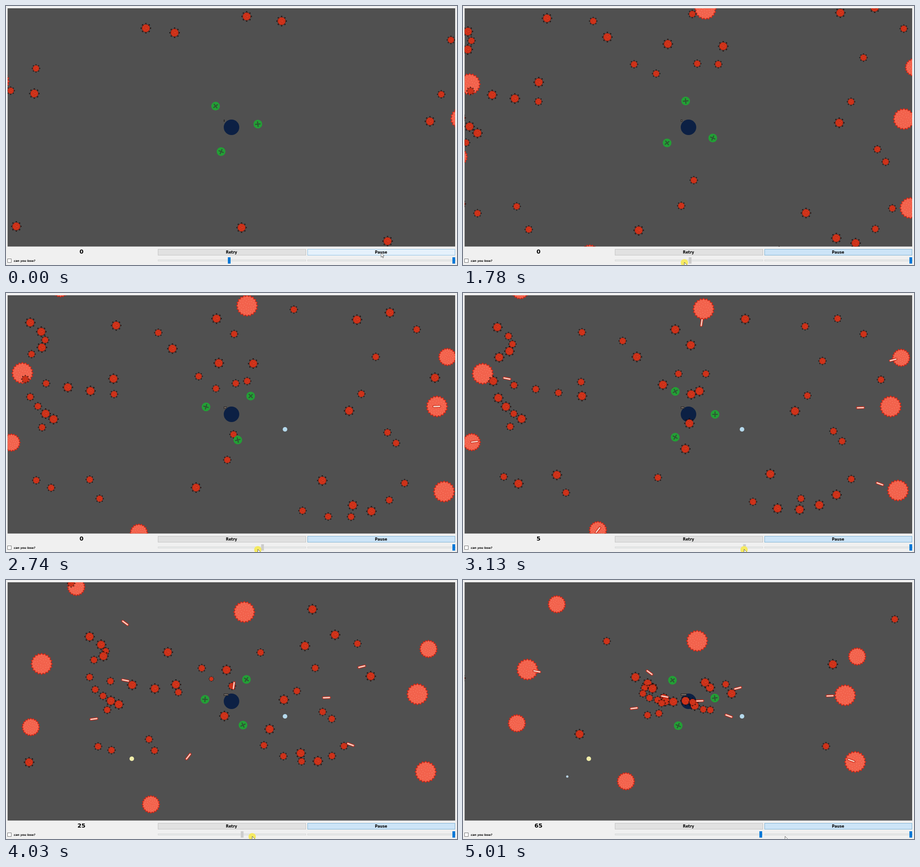
Recreate the animation shown at these times as an HTML page with a canvas. Size 986x568 px, loop 5050 ms.

```html
<!DOCTYPE html>
<html>
<head>
<meta charset="utf-8">
<title>Defend the core</title>
<style>
  html, body { margin: 0; width: 100%; height: 100%; overflow: hidden; background: #f0f0f0; }
  canvas { display: block; }
</style>
</head>
<body>
<canvas id="stage" width="986" height="568"></canvas>
<script>
const ctx = document.getElementById('stage').getContext('2d');
const LOOP = 5050, START = 750, TAU = Math.PI * 2;
const CX = 493, CY = 266;
const FIRE = 3130;        // positions below hold at this time
const RELOAD = 285, BOSS_PACE = .3, BULLET_PACE = .187, SPIN = -.00341;
const RING = 58, HIT = 66;
const FONT = '"DejaVu Sans", sans-serif';

// Piecewise linear value at time t from [time, value] pairs.
function track(t, keys) {
  if (t <= keys[0][0]) return keys[0][1];
  for (let i = 1; i < keys.length; i++) {
    const [t0, a] = keys[i - 1], [t1, b] = keys[i];
    if (t < t1) return a + (b - a) * (t - t0) / (t1 - t0);
  }
  return keys[keys.length - 1][1];
}

// The left slider sets the virus pace, so the advance is uneven.
const advance = [[710, -201], [1140, -151], [2340, -49], [FIRE, 0], [3630, 73], [4370, 157], [5010, 332]];
const paceSlider = [[1140, 488], [2340, 504], [FIRE, 616], [3630, 357], [4370, 651]];
const mouseX = [[710, 820], [1140, 484], [2340, 484], [FIRE, 615], [3630, 354], [4370, 694], [5010, 704]];
const mouseY = [[710, 541], [1140, 562]];

let seed = 7;
function random() {
  seed = (seed * 16807) % 2147483647;
  return seed / 2147483647;
}
const pulses = ['large', 'small', 'beat', 'offbeat'];

function mover(x, y, hit = 0) {
  return {
    angle: Math.atan2(y - CY, x - CX), dist: Math.hypot(x - CX, y - CY),
    hit, pulse: pulses[Math.floor(random() * 4)]
  };
}
function movers(list, hit) {
  const out = [];
  for (let i = 0; i < list.length; i += 2) out.push(mover(list[i], list[i + 1], hit));
  return out;
}
// n movers spread along a quadratic curve.
function swarm(n, [x0, y0], [cx, cy], [x1, y1]) {
  return Array.from({ length: n }, (_, i) => {
    const u = i / (n - 1), a = (1 - u) ** 2, b = 2 * u * (1 - u), c = u * u;
    return mover(a * x0 + b * cx + c * x1, a * y0 + b * cy + c * y1);
  });
}
function lateArrival() {
  const a = random() * TAU, d = 770 + random() * 120;
  return mover(CX + Math.cos(a) * d, CY + Math.sin(a) * d);
}

const viruses = [
  ...swarm(5, [75, 75], [139, 116], [79, 141]),
  ...swarm(5, [66, 193], [155, 212], [260, 226]),
  ...swarm(4, [77, 230], [102, 262], [128, 276]),
  ...swarm(6, [634, 458], [775, 510], [849, 408]),
  ...movers([260,86, 258,195, 464,80, 498,114, 531,177, 499,222, 517,215, 617,57, 748,73, 819,56,
    876,90, 786,149, 914,190, 753,225, 726,259, 810,303, 829,325, 103,293, 739,451, 495,286,
    486,342, 426,405, 672,397, 89,403, 121,418, 205,399, 225,438]),
  ...movers([748,-25, -63,434, 1130,102, 47,-63, 1109,468]),
  ...movers([472,231, 471,177, 437,201, 380,140, 349,105], HIT),
  ...Array.from({ length: 7 }, lateArrival)
];

// Bosses fire in this order; the first four are the big ones.
const bosses = movers([935,249, 43,177, 951,433, 526,35, 958,142, 19,327, 295,520, 125,-6])
  .map((b, i) => ({ ...b, r: i < 4 ? 23.5 : 19.5, lead: Math.max(0, 66 - 12 * i) }));

const pickups = [[610, 299, '#b5d9ec', 2150], [275, 392, '#f0edaa', 3540], [228, 431, '#b9d5ea', 4930]];

function at(angle, dist, draw) {
  ctx.save();
  ctx.translate(CX + Math.cos(angle) * dist, CY + Math.sin(angle) * dist);
  draw();
  ctx.restore();
}
function disc(x, y, r, color) {
  ctx.fillStyle = color;
  ctx.beginPath();
  ctx.arc(x, y, r, 0, TAU);
  ctx.fill();
}
function line(x0, y0, x1, y1, width, color) {
  ctx.strokeStyle = color;
  ctx.lineWidth = width;
  ctx.beginPath();
  ctx.moveTo(x0, y0);
  ctx.lineTo(x1, y1);
  ctx.stroke();
}
function box(x, y, w, h, fill, edge) {
  ctx.fillStyle = fill;
  ctx.fillRect(x, y, w, h);
  ctx.strokeStyle = edge;
  ctx.lineWidth = 1;
  ctx.strokeRect(x + .5, y + .5, w - 1, h - 1);
}
function label(text, x, y, font, align = 'center') {
  ctx.fillStyle = '#000';
  ctx.font = `${font} ${FONT}`;
  ctx.textAlign = align;
  ctx.textBaseline = 'middle';
  ctx.fillText(text, x, y);
}
function speckle(n, radius, size, color) {
  for (let i = 1; i < n; i++) {
    const d = Math.sqrt(i / n) * radius, a = i * 2.4;
    disc(Math.cos(a) * d, Math.sin(a) * d, size, color);
  }
}

function isLarge(pulse, t) {
  if (pulse == 'large' || pulse == 'small') return pulse == 'large';
  return (Math.cos(TAU * (t - 4350) / 1040) > 0) == (pulse == 'beat');
}

function drawVirus(scale) {
  ctx.scale(scale, scale);
  for (let i = 0; i < 8; i++) {
    ctx.rotate(TAU / 8);
    line(8, 0, 11, 0, 1.2, '#1c0a08');
    line(10.7, -1.6, 10.7, 1.6, 1.2, '#1c0a08');
  }
  disc(0, 0, 9, '#5c150c');
  disc(0, 0, 8.2, '#e0391d');
  speckle(26, 8, .8, '#8c1d10');
}

function drawBoss(r) {
  ctx.beginPath();
  for (let i = 0; i < 40; i++) {
    const a = i * TAU / 40, d = i % 2 ? r * .87 : r;
    ctx.lineTo(Math.cos(a) * d, Math.sin(a) * d);
  }
  ctx.closePath();
  ctx.fillStyle = '#f2624c';
  ctx.strokeStyle = '#cf2413';
  ctx.lineWidth = 1.4;
  ctx.fill();
  ctx.stroke();
  speckle(40, r * .82, .7, '#ff8c76');
}

function drawBullet(angle) {
  ctx.rotate(angle);
  ctx.lineCap = 'round';
  line(-6.5, 0, 6.5, 0, 5.5, '#c9281a');
  line(-6.5, 0, 6.5, 0, 2.8, '#f6d3c4');
}

function drawGuard(angle) {
  disc(0, 0, 9.5, '#22a035');
  ctx.rotate(angle);
  line(-6, 0, 6, 0, 2.4, '#2f5434');
  line(0, -6, 0, 6, 2.4, '#2f5434');
}

function drawField(t) {
  const moved = track(t, advance), shot = (t - FIRE) * BULLET_PACE;
  ctx.save();
  ctx.beginPath();
  ctx.rect(3.5, 5, 978.5, 522.5);
  ctx.clip();
  ctx.fillStyle = '#505050';
  ctx.fillRect(0, 0, 986, 568);

  for (const [x, y, color, born] of pickups) {
    if (t > born) disc(x, y, 5 * Math.min(1, (t - born) / 160), color);
  }
  disc(CX, CY, 17, '#0c2044');
  box(476, 249, 2 + 11 * Math.max(0, t - 1140) / 3870, 5, '#6b6460', '#2a2624');

  for (const b of bosses) at(b.angle, b.dist - moved * BOSS_PACE, () => drawBoss(b.r));
  for (const v of viruses) {
    const left = v.dist - moved;
    const shrink = v.hit ? Math.min(1, 1 - (v.hit - left) / 32) : 1;
    if (left < -6 || shrink <= 0) continue;
    at(v.angle, Math.max(left, v.hit), () => drawVirus(shrink * (isLarge(v.pulse, t) ? 1 : .8)));
  }
  for (let i = 0; i < 3; i++) {
    const a = -.12 + Math.max(0, t - 710) * SPIN + i * TAU / 3;
    at(a, RING, () => drawGuard(a));
  }
  for (const b of bosses) {
    for (let n = 0; n < 2; n++) {
      const left = b.dist - b.lead - shot + n * RELOAD;
      if (left > b.dist - moved * BOSS_PACE || left < 20) continue;
      at(b.angle, left, () => drawBullet(b.angle));
    }
  }
  ctx.restore();
}

function drawSlider(x, handle, color) {
  box(x, 556, 324, 4, '#e7eaea', '#d9d9d9');
  ctx.fillStyle = color;
  ctx.fillRect(handle - 3, 551, 6, 14);
}

function drawControls(t, dragging) {
  const pressed = t > 800;
  const kills = Math.floor((Math.max(0, t - 2650) / 474) ** 1.6);
  label(5 * kills, 165, 540, 'bold 12.5px');
  box(332, 533, 324, 14, '#e1e1e1', '#c4c4c4');
  label('Retry', 493, 540.5, 'bold 8px');
  box(659, 533, 323, 14, pressed ? '#cce4f7' : '#e5f1fb', pressed ? '#7fb2d3' : '#92c3e6');
  label('Pause', 820, 540.5, 'bold 8px');
  box(3, 554, 9, 9, '#fff', '#777');
  label('can you lose?', 17, 559, 'italic bold 6.2px', 'left');
  drawSlider(332, track(t, paceSlider), dragging ? '#cccccc' : '#0078d7');
  drawSlider(659, 979, '#0078d7');
}

function drawCursor(t, dragging) {
  ctx.save();
  ctx.translate(track(t, mouseX), track(t, mouseY));
  if (dragging) disc(0, 1, 8, '#f5ea62');
  const arrow = new Path2D('M0 0V10L2.3 8L4 11.5L5.4 10.8L3.8 7.4L6.8 7Z');
  ctx.fillStyle = '#fff';
  ctx.strokeStyle = '#444';
  ctx.lineWidth = .8;
  ctx.fill(arrow);
  ctx.stroke(arrow);
  ctx.restore();
}

function frame() {
  const now = performance.now() % LOOP;
  const t = now < START ? 0 : now;
  const dragging = t > 1400 && t < 4600;
  ctx.fillStyle = '#f0f0f0';
  ctx.fillRect(0, 0, 986, 568);
  drawField(t);
  drawControls(t, dragging);
  drawCursor(t, dragging);
  requestAnimationFrame(frame);
}
frame();
</script>
</body>
</html>
```
